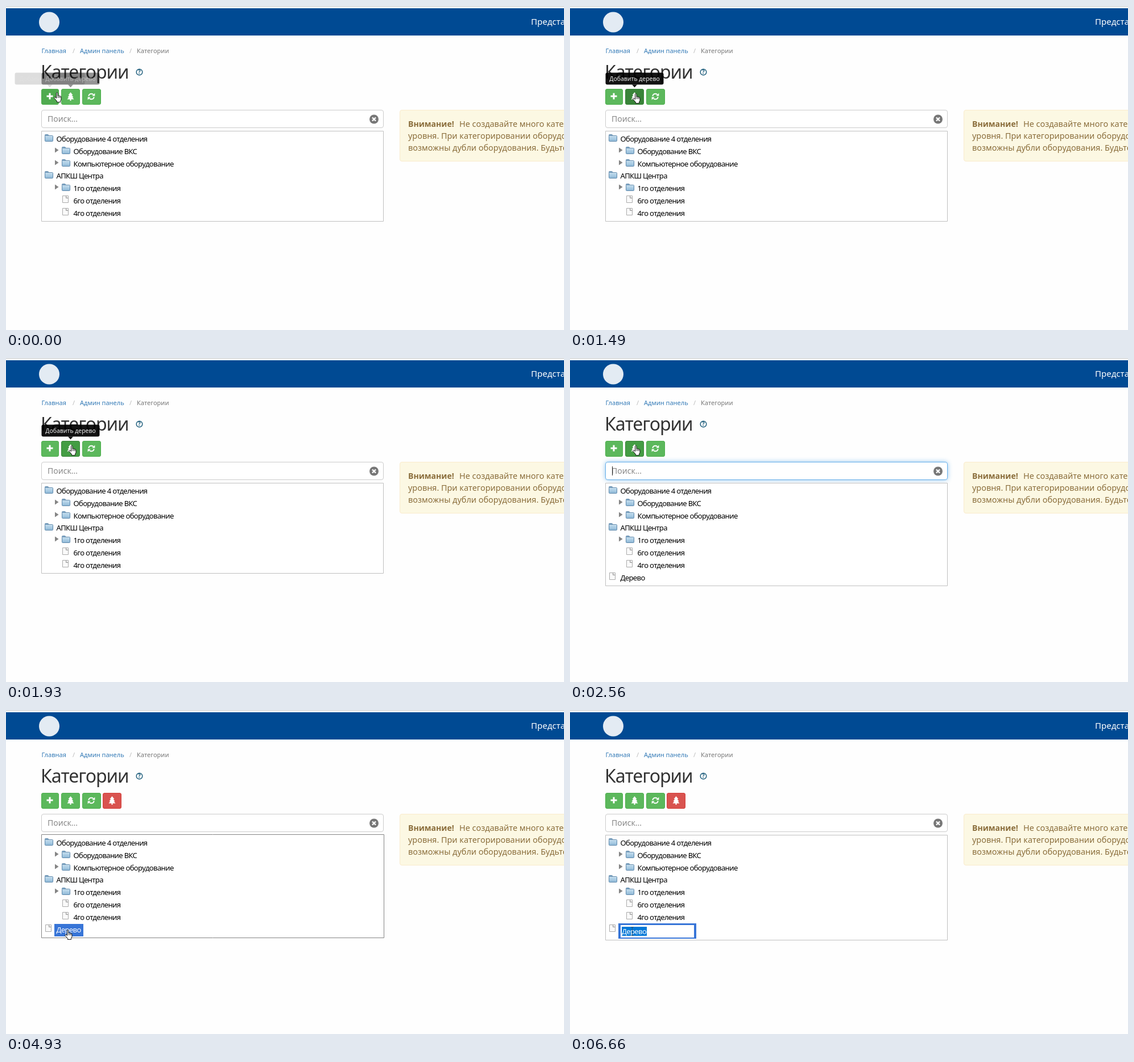
Recreate the animation shown at these times as an HTML page with a canvas. Size 981 by 571 pixels, loop 8 s.

```html
<!DOCTYPE html>
<html lang="ru">
<head>
<meta charset="utf-8">
<title>Категории</title>
<style>
html, body { margin: 0; width: 100%; height: 100%; overflow: hidden; background: #fefefe; }
canvas { display: block; }
</style>
</head>
<body>
<canvas id="stage" width="981" height="571"></canvas>
<script>
const ctx = document.getElementById('stage').getContext('2d');
const LOOP = 8000;
const SANS = '"Noto Sans", "Open Sans", sans-serif';
const ARIAL = '"Liberation Sans", Arial, sans-serif';

const HAND = new Path2D('M4.5 10.5V1.8a1.2 1.2 0 0 1 2.4 0V6.3a1.15 1.15 0 0 1 2.2 .4a1.15 1.15 0 0 1 2.1 .6a1.1 1.1 0 0 1 1.8 .8V12.5L11.6 15.3V17.4H5.4V15.6L.9 10.4a1.2 1.2 0 0 1 1.8-1.5z');
const HAND_LINES = new Path2D('M7 6.5V10M9.2 7V10M11.2 7.5V10');
const ARROW = new Path2D('M.5 .5V13L3.4 10.3L5.4 15L7.5 14.1L5.5 9.5H9.4z');

// Pointer: start time, kind, left, top
const POINTER = [
  [0, 'hand', 84, 152], [210, 'hand', 80, 153], [420, 'hand', 117, 154],
  [630, 'hand', 111, 154], [850, 'hand', 110, 154], [1710, 'arrow', 114, 153],
  [1930, 'hand', 110, 154], [2980, 'hand', 109, 160], [3190, 'beam', 115, 192],
  [3410, 'arrow', 114, 258], [3620, 'arrow', 108, 317], [3840, 'arrow', 108, 364],
  [4060, 'hand', 102, 386], [4280, 'hand', 103, 387], [6450, 'beam', 109, 382]
];

const ROWS = [
  ['folder', 0, 'Оборудование 4 отделения'],
  ['closed', 1, 'Оборудование ВКС'],
  ['closed', 1, 'Компьютерное оборудование'],
  ['folder', 0, 'АПКШ Центра'],
  ['closed', 1, '1го отделения'],
  ['page', 1, '6го отделения'],
  ['page', 1, '4го отделения'],
  ['page', 0, 'Дерево']
];

const within = (t, from, to) => t >= from && t < to;

function rect(x, y, w, h, fill) {
  ctx.fillStyle = fill;
  ctx.fillRect(x, y, w, h);
}

function box(x, y, w, h, r, fill, stroke) {
  ctx.beginPath();
  ctx.roundRect(x + .5, y + .5, w - 1, h - 1, r);
  ctx.fillStyle = fill;
  ctx.fill();
  if (stroke) {
    ctx.strokeStyle = stroke;
    ctx.lineWidth = 1;
    ctx.stroke();
  }
}

function poly(fill, ...points) {
  ctx.beginPath();
  for (let i = 0; i < points.length; i += 2) ctx.lineTo(points[i], points[i + 1]);
  ctx.closePath();
  ctx.fillStyle = fill;
  ctx.fill();
}

function circle(x, y, r, fill) {
  ctx.beginPath();
  ctx.arc(x, y, r, 0, Math.PI * 2);
  ctx.fillStyle = fill;
  ctx.fill();
}

function text(str, x, y, size, color, { font = SANS, weight = 400, gap = 0, align = 'left' } = {}) {
  ctx.font = `${weight} ${size}px ${font}`;
  ctx.letterSpacing = gap + 'px';
  ctx.textAlign = align;
  ctx.fillStyle = color;
  ctx.fillText(str, x, y);
}

function drawHeader() {
  rect(0, 0, 981, 571, '#fefefe');
  rect(0, 0, 981, 1, '#c8c8c8');
  rect(0, 4, 981, 48, '#004a93');
  circle(76, 28.5, 18, '#e3ebf3');
  text('Представления', 923, 33, 15, '#fff');

  text('Главная', 62.5, 83, 11, '#337ab7');
  text('/', 117, 83, 11, '#bbb');
  text('Админ панель', 130, 83, 11, '#337ab7');
  text('/', 217, 83, 11, '#bbb');
  text('Категории', 230, 83, 11, '#777');

  text('Категории', 61, 128, 32, '#333', { gap: -1.1 });
  ctx.beginPath();
  ctx.arc(234.5, 116.5, 5.3, 0, Math.PI * 2);
  ctx.strokeStyle = '#23617f';
  ctx.lineWidth = 1.5;
  ctx.stroke();
  text('?', 234.5, 120.3, 10, '#23617f', { weight: 700, align: 'center' });
}

function conifer(x) {
  poly('#fff', x, 152, x + 4, 157, x - 4, 157);
  poly('#fff', x, 154, x + 5, 161, x - 5, 161);
  poly('#fff', x, 157, x + 6, 164.5, x - 6, 164.5);
  rect(x - 1, 164, 2, 3, '#fff');
}

function refresh(x, y) {
  ctx.strokeStyle = '#fff';
  ctx.lineWidth = 2;
  for (const turn of [0, Math.PI]) {
    ctx.save();
    ctx.translate(x, y);
    ctx.rotate(turn);
    ctx.beginPath();
    ctx.arc(0, 0, 4.8, Math.PI * 1.05, Math.PI * 1.75);
    ctx.stroke();
    poly('#fff', 6.3, -6, 6.3, -1, 1.3, -1);
    ctx.restore();
  }
}

function drawButtons(t) {
  const green = '#5cb85c', edge = '#4cae4c', hover = '#449d44';
  const plus = t < 210 ? '#50ab50' : t < 420 ? hover : green;
  const tree = within(t, 1490, 1930) ? '#398439' : within(t, 420, 3410) ? hover : green;
  box(62, 146, 31, 28, 2.5, plus, edge);
  box(97, 146, 33, 28, 2.5, tree, tree === green ? edge : '#398439');
  box(134, 146, 33, 28, 2.5, green, edge);
  rect(71.5, 157.5, 11, 3, '#fff');
  rect(75.5, 153.5, 3, 11, '#fff');
  conifer(113.5);
  refresh(150, 159.5);
  if (t >= 4930) {
    box(170, 146, 33, 28, 2.5, '#d9534f', '#d43f3a');
    conifer(186.5);
  }
}

function drawSearch(t) {
  const focused = within(t, 2360, 4930);
  ctx.save();
  if (focused) {
    ctx.shadowColor = `rgba(102,175,233,${t < 2560 ? .4 : .8})`;
    ctx.shadowBlur = 8;
  }
  box(62, 183, 602, 32, 3.5, '#fff');
  ctx.restore();
  box(62, 183, 602, 32, 3.5, '#fff', focused ? '#66afe9' : '#ccc');
  text('Поиск...', 73, 204, 14, '#888');

  circle(647, 199.5, 8, '#777');
  ctx.strokeStyle = '#fff';
  ctx.lineWidth = 2.4;
  ctx.beginPath();
  ctx.moveTo(644, 196.5);
  ctx.lineTo(650, 202.5);
  ctx.moveTo(650, 196.5);
  ctx.lineTo(644, 202.5);
  ctx.stroke();

  const caret = within(t, 2360, 2760) || within(t, 3410, 3840) || within(t, 4280, 4710);
  if (caret) rect(74, 191, 1, 16, '#222');
}

function folder(x, y) {
  const shade = ctx.createLinearGradient(0, y, 0, y + 12);
  shade.addColorStop(0, '#b4d3e8');
  shade.addColorStop(1, '#6c9fc6');
  box(x, y - 6, 7, 4, 1, '#8db4d2', '#6489a8');
  box(x, y - 4, 15, 11, 1, shade, '#5d87aa');
  rect(x + 1, y - 3, 13, 1, '#d4e7f3');
}

function page(x, y) {
  box(x, y - 7, 11, 13, 0, '#fafafa', '#aaa');
  poly('#ddd', x + 6.5, y - 6.5, x + 10.5, y - 2.5, x + 6.5, y - 2.5);
  ctx.beginPath();
  ctx.moveTo(x + 6.5, y - 6.5);
  ctx.lineTo(x + 6.5, y - 2.5);
  ctx.lineTo(x + 10.5, y - 2.5);
  ctx.strokeStyle = '#999';
  ctx.stroke();
}

function drawTree(t) {
  const focused = within(t, 4930, 6450);
  const bottom = t < 2360 ? 380 : t < 6450 ? 402 : 406;
  const extra = focused ? 1 : 0;
  box(62, 220 - extra, 602 + extra, bottom - 220 + extra, 0, '#fff', focused ? '#858585' : '#c0c0c0');

  const count = t < 2360 ? 7 : 8;
  ROWS.slice(0, count).forEach(([kind, level, label], i) => {
    const y = Math.round(232 + i * 21.8);
    const x = 68 + level * 30;
    if (kind === 'page') page(x + 1, y);
    else folder(x, y);
    if (kind === 'closed') poly('#858585', 86, y - 4.5, 92.5, y, 86, y + 4.5);

    const last = i === 7;
    if (last && t >= 6450) {
      rect(85, 376, 137, 27, '#3875d7');
      rect(89, 379, 129, 22, '#fff');
      const selected = t >= 6660;
      if (selected) rect(91, 382, 44, 16, '#0078d7');
      text(label, 91, 395, 13, selected ? '#fff' : '#000', { gap: -.65 });
      return;
    }
    if (last && focused) rect(85, 377, 51, 22, '#3875d7');
    text(label, x + 20.5, y + 7, 13, last && focused ? '#fff' : '#000', { gap: -.65 });
  });
}

function drawNotice() {
  const brown = '#8a6d3b', size = 14.4;
  box(692, 183, 310, 91, 3.5, '#fcf8e3', '#faebcc');
  text('Внимание!', 707, 213, 14, brown, { weight: 700 });
  text('Не создавайте много категорий', 797, 213, size, brown);
  text('уровня. При категорировании оборудования', 707, 234, size, brown);
  text('возможны дубли оборудования. Будьте', 707, 255, size, brown);
}

function tooltip(label, center, width, alpha) {
  ctx.save();
  ctx.globalAlpha = alpha;
  box(center - width / 2, 117, width, 22, 3, '#000');
  poly('#000', center - 4.5, 138.5, center + 4.5, 138.5, center, 143.5);
  text(label, center, 132, 10.4, '#fff', { align: 'center' });
  ctx.restore();
}

function drawTooltips(t) {
  if (t < 420) tooltip('Добавить категорию', 77, 124, t < 210 ? .13 : .9);
  if (t < 210 || within(t, 420, 2360)) tooltip('Добавить дерево', 113.5, 103, t < 210 ? .42 : .93);
}

function drawDialog() {
  rect(0, 4, 981, 567, 'rgba(26,26,26,.5)');
  rect(407, 185, 362, 133, 'rgba(60,60,60,.35)');
  rect(408, 186, 360, 131, '#fbfbfb');
  rect(408, 267, 360, 1, '#dfdfdf');
  text('Что-то пошло не так. Перезагрузите форму с помощью клавиши.', 426, 230, 10.67, '#000', { font: ARIAL });
  rect(676, 281, 69, 19, '#0078d7');
  rect(678, 283, 65, 15, '#e1e1e1');
  text('ОК', 710, 294.5, 11.5, '#000', { font: ARIAL, align: 'center' });
}

function clickRing(x, y) {
  ctx.beginPath();
  ctx.arc(x, y, 7, 0, Math.PI * 2);
  ctx.strokeStyle = 'rgba(120,120,120,.5)';
  ctx.lineWidth = 1;
  ctx.stroke();
}

function drawPointer(t) {
  const [, kind, x, y] = POINTER.findLast(p => p[0] <= t);
  if (kind === 'beam') {
    ctx.globalAlpha = .6;
    rect(x, y, 1, 16, '#444');
    rect(x - 2, y, 5, 1, '#444');
    rect(x - 2, y + 15, 5, 1, '#444');
    ctx.globalAlpha = 1;
    return;
  }
  ctx.save();
  ctx.translate(x, y);
  ctx.fillStyle = '#fff';
  ctx.strokeStyle = '#111';
  ctx.lineWidth = 1;
  const shape = kind === 'hand' ? HAND : ARROW;
  ctx.fill(shape);
  ctx.stroke(shape);
  if (kind === 'hand') {
    ctx.lineWidth = .8;
    ctx.stroke(HAND_LINES);
  }
  ctx.restore();
}

function render(t) {
  drawHeader();
  drawButtons(t);
  drawSearch(t);
  drawTree(t);
  drawNotice();
  drawTooltips(t);
  if (within(t, 1710, 1930)) drawDialog();
  drawPointer(t);
  if (within(t, 1290, 1490)) clickRing(115.5, 155);
  if (within(t, 6240, 6450)) clickRing(108, 389);
}

const start = performance.now();
function tick() {
  render((performance.now() - start) % LOOP);
  requestAnimationFrame(tick);
}
tick();
</script>
</body>
</html>
```
